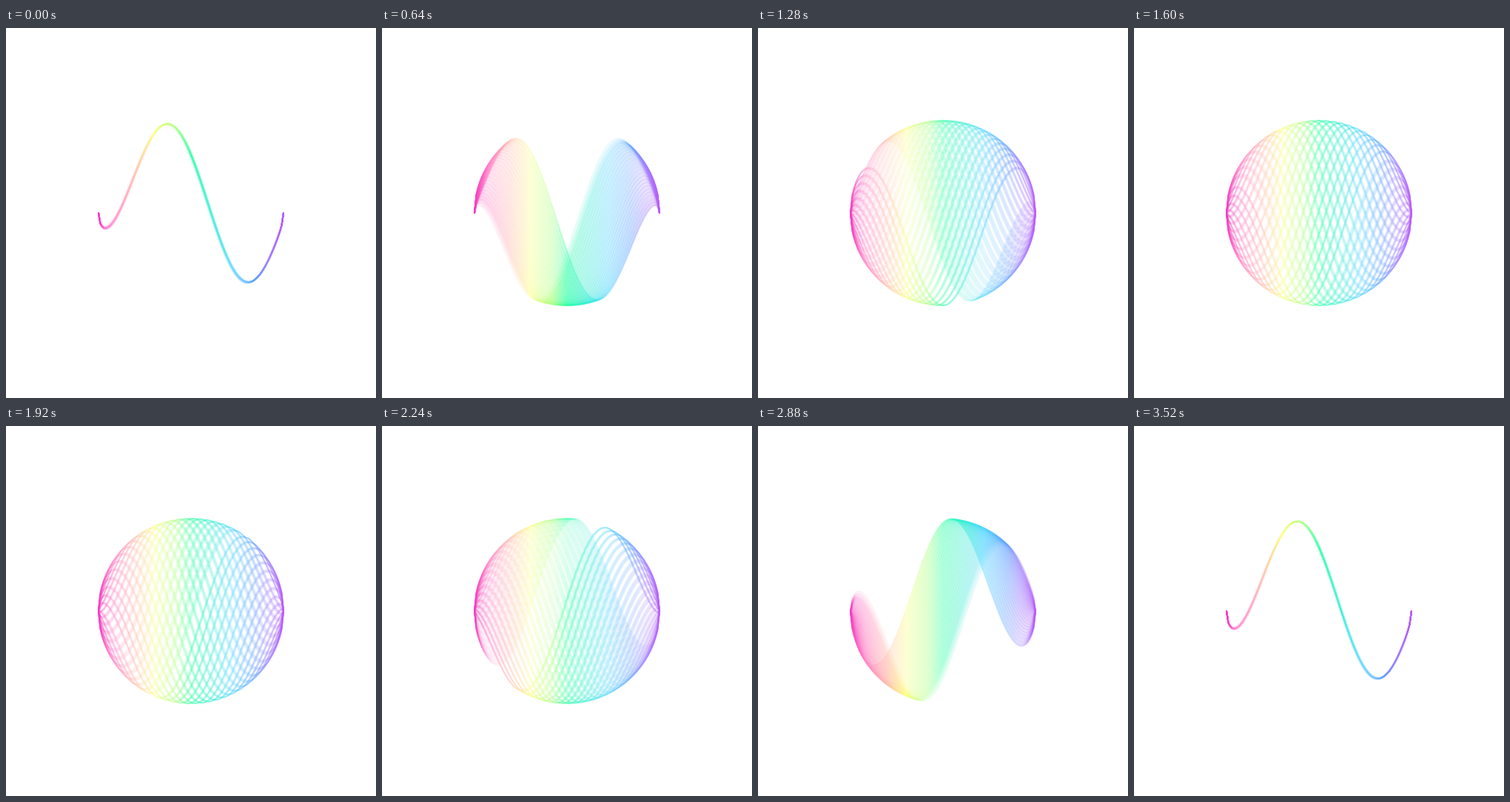
An HTML page with a canvas for the animation above (3560 ms loop, 512 by 512 pixels).

```html
<!DOCTYPE html>
<html lang="en">
<head>
<meta charset="utf-8">
<title>Wave sphere</title>
<style>
html, body { margin: 0; width: 100%; height: 100%; overflow: hidden; background: #fff; }
canvas { display: block; width: 512px; height: 512px; }
</style>
</head>
<body>
<canvas id="stage" width="512" height="512"></canvas>
<script>
const SIZE = 512, MID = 256, RADIUS = 128, PERIOD = 256;
const STEPS = 89, STEP_MS = 40;
const LINES = 24, POINTS = 100, SUBFRAMES = 8;

const ctx = document.getElementById('stage').getContext('2d');
const layer = document.createElement('canvas');
layer.width = layer.height = SIZE;
const pen = layer.getContext('2d');

const rainbow = pen.createLinearGradient(MID - RADIUS, 0, MID + RADIUS, 0);
[
  [0, '#f53cc0'], [0.08, '#ff84c8'], [0.19, '#ffb9b0'], [0.3, '#fdff80'],
  [0.42, '#a8ff80'], [0.5, '#1cffa0'], [0.62, '#2cecd8'], [0.72, '#4cd6ff'],
  [0.84, '#62a2ff'], [0.92, '#a080ff'], [1, '#b85cfa']
].forEach(([at, color]) => rainbow.addColorStop(at, color));

pen.strokeStyle = rainbow;
pen.lineWidth = 2;
pen.lineJoin = 'round';
pen.lineCap = 'round';

// Fan width in turns: opens over half a loop, then closes from the other side.
function fan(step) {
  const u = (((step + 1) % STEPS) + STEPS) % STEPS / STEPS * 2;
  const ease = x => 0.5 - 0.5 * Math.cos(Math.PI * Math.pow(x, 0.93));
  return u < 1 ? ease(u) : -ease(2 - u);
}

// A sine wave squeezed into the circle, with a crest at the given x.
function wave(crest) {
  pen.beginPath();
  for (let i = 0; i <= POINTS; i++) {
    const u = i / POINTS * 2 - 1;
    const x = MID + u * RADIUS;
    const height = RADIUS * Math.sqrt(1 - u * u);
    pen.lineTo(x, MID - height * Math.cos((x - crest) / PERIOD * 2 * Math.PI));
  }
  pen.stroke();
}

function drawLayer(step) {
  pen.globalAlpha = 1;
  pen.fillStyle = '#fff';
  pen.fillRect(0, 0, SIZE, SIZE);
  pen.globalAlpha = 0.58;
  const spread = fan(step);
  for (let i = LINES - 1; i >= 0; i--) {
    wave(220 - PERIOD * (step / STEPS + spread * i / LINES));
  }
}

// Average several moments of one step for motion blur.
function draw(step) {
  for (let j = 0; j < SUBFRAMES; j++) {
    drawLayer(step + (j + 0.5) / SUBFRAMES - 0.5);
    ctx.globalAlpha = 1 / (j + 1);
    ctx.drawImage(layer, 0, 0);
  }
}

let start = null, shown = -1;
function tick() {
  const now = performance.now();
  if (start === null) start = now;
  const step = Math.floor((now - start) / STEP_MS) % STEPS;
  if (step !== shown) {
    shown = step;
    draw(step);
  }
  requestAnimationFrame(tick);
}
tick();
</script>
</body>
</html>
```
